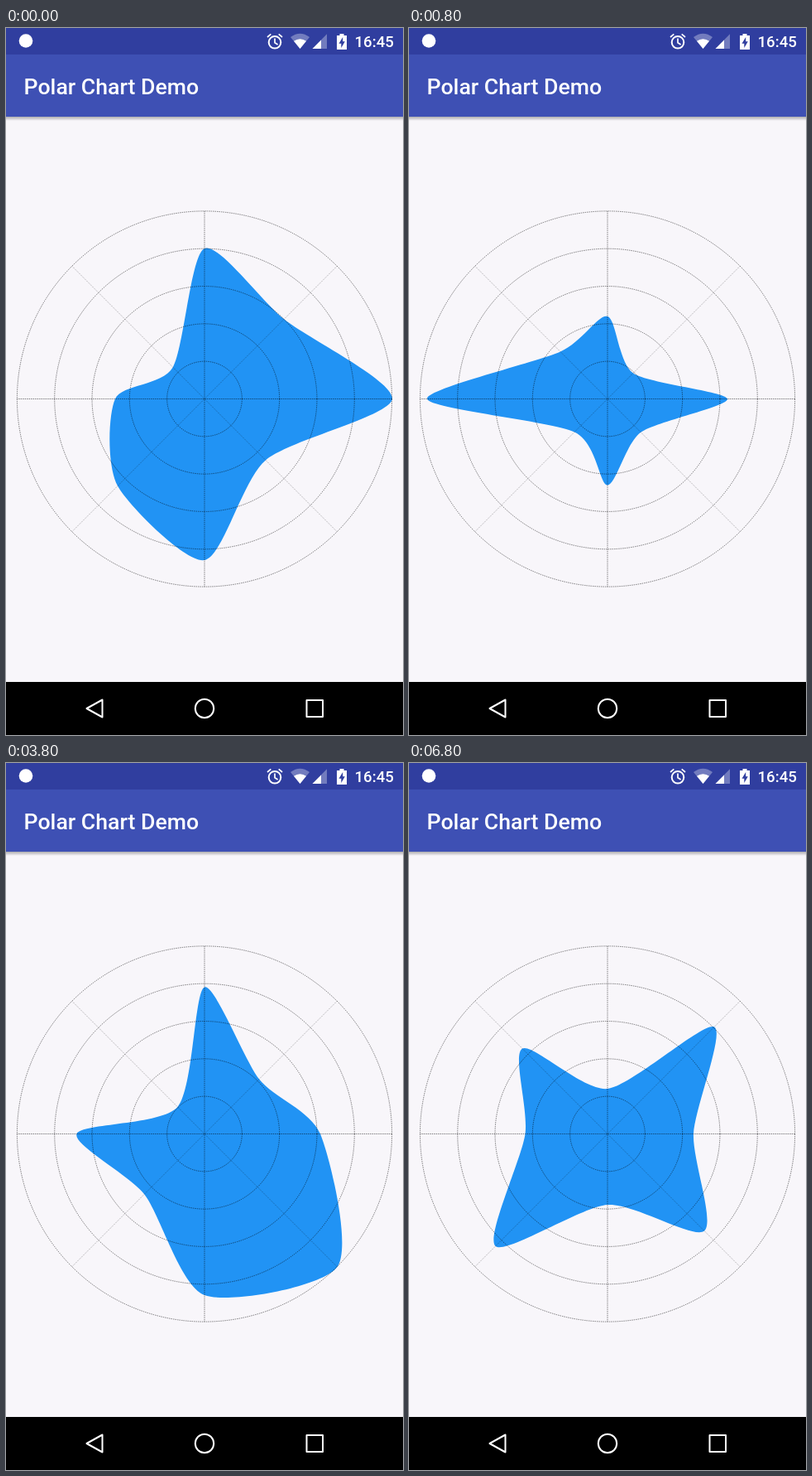
These frames come from a looping animation (480 px wide and 853 px high, 8 s). An HTML page:

```html
<!DOCTYPE html>
<html lang="en">
<head>
<meta charset="utf-8">
<title>Polar Chart Demo</title>
<style>
  html, body { margin: 0; width: 100%; height: 100%; overflow: hidden; background: #f8f6fa; }
  svg { display: block; width: 100%; height: 100%; }
  text { font: 500 26.67px Roboto, sans-serif; fill: #fff; }
  .clock { font-size: 18.67px; }
  .line { fill: none; stroke: #fff; stroke-width: 2; }
  #grid { fill: none; stroke: #000; stroke-opacity: .6; stroke-width: .85; stroke-dasharray: 1.4 1.1; }
  #grid .diagonal { stroke-opacity: .42; stroke-width: .7; }
</style>
</head>
<body>
<svg viewBox="0 0 480 853">
  <defs>
    <linearGradient id="shade" x2="0" y2="1">
      <stop stop-color="#000" stop-opacity=".3"/>
      <stop offset="1" stop-color="#000" stop-opacity="0"/>
    </linearGradient>
  </defs>

  <path id="area" fill="#2193f4"/>
  <g id="grid"></g>

  <!-- Status and title bars -->
  <rect y="107" width="480" height="5" fill="url(#shade)"/>
  <rect width="480" height="107" fill="#3e50b4"/>
  <rect width="480" height="32" fill="#303e9f"/>
  <circle cx="24" cy="15.5" r="8.3" fill="#fff"/>
  <g class="line">
    <circle cx="325" cy="17.3" r="7.3"/>
    <path d="M325 12.5v5.3l3.6 2.2M316 11l4.3-3.7M334 11l-4.3-3.7" stroke-width="1.7"/>
  </g>
  <g fill="#fff">
    <path d="M355.5 25L344 11Q355.5 2.5 367 11Z" opacity=".32"/>
    <path d="M355.5 25L348 15.8Q355.5 10.5 363 15.8Z"/>
    <path d="M370.5 25H388V7.3Z" opacity=".32"/>
    <path d="M370.5 25H381V14.4Z"/>
    <path d="M400 9h3.5V7h5v2h3.5v17h-12Z"/>
  </g>
  <path d="M407.2 11l-4.7 7.7h2.8V24l4.5-7.7h-2.6Z" fill="#303e9f"/>
  <text class="clock" x="421.5" y="23">16:45</text>
  <text x="21.5" y="79.5">Polar Chart Demo</text>

  <!-- Navigation bar -->
  <rect y="789" width="480" height="64" fill="#000"/>
  <g class="line" stroke-width="2.3" stroke-linejoin="round">
    <path d="M116.5 810.5V831.5L97.5 821Z"/>
    <circle cx="240" cy="821" r="11.2"/>
    <rect x="363.5" y="811" width="19.5" height="20"/>
  </g>
</svg>
<script>
  const CX = 240, CY = 447.5, RADIUS = 226.6, SMOOTH = .125;
  const STEP = 50, LOOP = 8000, DURATION = 300;
  const starts = [483, 3500, 6483];
  // Radii from east, counterclockwise by 45 degrees
  const shapes = [
    [227, 136, 181.5, 54, 108, 148.5, 194.5, 104.5],
    [145, 44, 99.5, 80.5, 218, 56.5, 104, 57],
    [140, 93.5, 177, 46, 154.5, 103, 194.5, 227],
    [104, 182.5, 54.5, 145.5, 99.5, 191.5, 85.5, 165.5]
  ];
  const area = document.getElementById('area');
  const grid = document.getElementById('grid');

  const polar = (r, i) => {
    const a = i * Math.PI / 4;
    return [CX + r * Math.cos(a), CY - r * Math.sin(a)];
  };

  let marks = '';
  for (let i = 1; i <= 5; i++)
    marks += `<circle cx="${CX}" cy="${CY}" r="${RADIUS * i / 5}"/>`;
  for (let i = 0; i < 4; i++)
    marks += `<path class="${i % 2 ? 'diagonal' : ''}" d="M${polar(RADIUS, i)}L${polar(RADIUS, i + 4)}"/>`;
  grid.innerHTML = marks;

  function outline(radii) {
    const pts = radii.map(polar);
    const at = i => pts[(i + 8) % 8];
    const handle = (i, k) => at(i).map((v, n) => v + k * (at(i + 1)[n] - at(i - 1)[n]));
    let d = 'M' + pts[0];
    for (let i = 0; i < 8; i++)
      d += `C${handle(i, SMOOTH)} ${handle(i + 1, -SMOOTH)} ${at(i + 1)}`;
    return d + 'Z';
  }

  function radiiAt(time) {
    let radii = shapes[0];
    starts.forEach((start, n) => {
      const t = Math.min(1, Math.max(0, (time - start) / DURATION));
      const p = (1 - Math.cos(Math.PI * t)) / 2;
      radii = radii.map((r, i) => r + (shapes[n + 1][i] - r) * p);
    });
    return radii;
  }

  function draw() {
    const time = Math.floor(performance.now() % LOOP / STEP) * STEP;
    area.setAttribute('d', outline(radiiAt(time)));
    requestAnimationFrame(draw);
  }
  draw();
</script>
</body>
</html>
```
